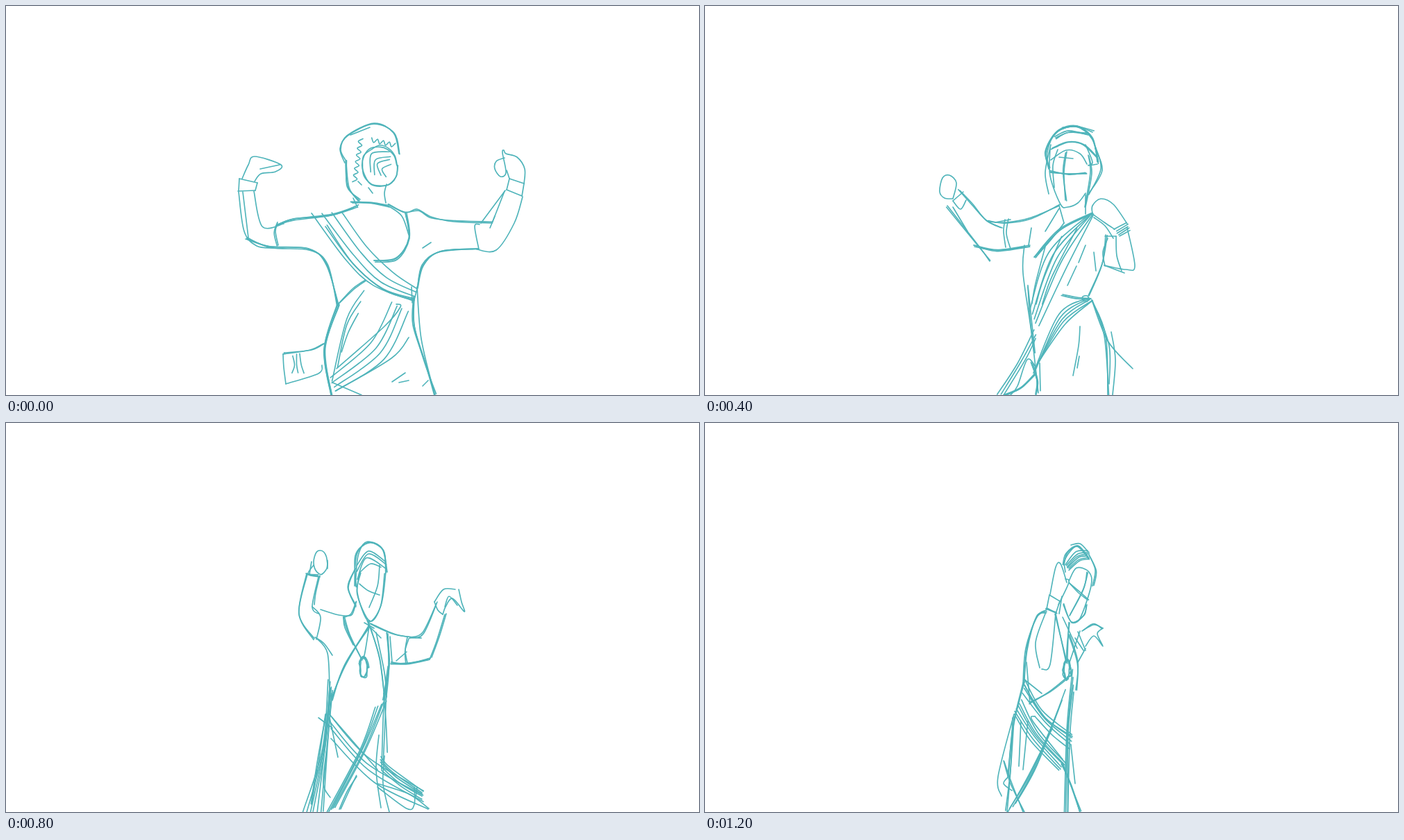
Animation of 998x561 px, one loop 1400 ms. Source, as an HTML page:

```html
<!DOCTYPE html>
<html lang="en">
<head>
<meta charset="utf-8">
<title>Turning dancer sketch</title>
<style>
  html, body { margin: 0; width: 100%; height: 100%; overflow: hidden; background: #fff; }
  svg { display: block; width: 100%; height: 100%; }
  path { fill: none; stroke: #4fb4ba; stroke-width: 1.65; stroke-linecap: round; stroke-linejoin: round; }
  g { visibility: hidden; animation: show 1400ms step-end infinite; animation-delay: calc(var(--i) * 200ms - 1400ms); }
  @keyframes show {
    0% { visibility: visible; }
    14.2857%, 100% { visibility: hidden; }
  }
</style>
</head>
<body>
<svg id="stage" viewBox="0 0 998 561"></svg>
<script>
const stage = document.getElementById("stage");
let group, seed = 7;
const rand = () => (seed = seed * 16807 % 2147483647) / 2147483647;
const jitter = amount => (rand() * 2 - 1) * amount;
const add = (parent, tag) =>
  parent.appendChild(document.createElementNS("http://www.w3.org/2000/svg", tag));
const parse = text => text.split(" ").map(p => p.split(",").map(Number));
const shake = (pts, amount) => pts.map(([x, y]) => [x + jitter(amount), y + jitter(amount)]);

// Catmull-Rom spline through the points as cubic segments
function draw(pts) {
  const at = i => pts[Math.max(0, Math.min(pts.length - 1, i))];
  const handle = (p, a, b) => p.map((v, k) => v + (b[k] - a[k]) / 6);
  let d = "M" + pts[0];
  for (let i = 0; i < pts.length - 1; i++) {
    d += "C" + [handle(at(i), at(i - 1), at(i + 1)), handle(at(i + 1), at(i + 2), at(i)), at(i + 1)];
  }
  add(group, "path").setAttribute("d", d);
}

const line = (...texts) => texts.forEach(t => draw(parse(t)));

// The same stroke sketched over itself n times
function rough(n, ...texts) {
  for (const t of texts) {
    const pts = parse(t);
    for (let k = 0; k < n; k++) draw(k ? shake(pts, 2.3) : pts);
  }
}

// n strokes spread evenly between two guides
function fan(n, from, to) {
  const a = parse(from), b = parse(to);
  for (let k = 0; k < n; k++) {
    const t = k / (n - 1);
    draw(shake(a.map((p, i) => p.map((v, j) => v + (b[i][j] - v) * t)), n > 2 ? 1.2 : 0));
  }
}

function oval(cx, cy, rx, ry, n = 1) {
  for (let k = 0; k < n; k++) {
    const pts = [];
    for (let a = 0; a <= 12; a++) {
      pts.push([cx + rx * Math.cos(a * Math.PI / 6), cy + ry * Math.sin(a * Math.PI / 6)]);
    }
    draw(shake(pts, n > 1 ? 1.8 : 0.6));
  }
}

function zigzag(x1, y1, x2, y2, n, size) {
  const len = Math.hypot(x2 - x1, y2 - y1), pts = [];
  for (let i = 0; i <= n; i++) {
    const off = (i % 2 ? size : -size) / len;
    pts.push([x1 + (x2 - x1) * i / n - (y2 - y1) * off, y1 + (y2 - y1) * i / n + (x2 - x1) * off]);
  }
  draw(pts);
}

function backView() {
  rough(2, "490,224 482,207 491,187 530,169 558,183 566,213");
  line("496,186 524,175");
  rough(3, "489,224 492,260 509,281", "497,283 525,284 550,288");
  zigzag(511, 191, 502, 254, 13, 3);
  zigzag(526, 193, 560, 201, 8, 3);
  oval(538, 231, 26, 29, 2);
  fan(4, "524,240 526,214 552,210", "547,247 541,235 554,229");
  line("548,257 545,270 547,284", "507,253 512,258", "522,262 528,270", "506,290 500,277");

  rough(3, "506,288 470,300 415,307 391,315");
  line("340,249 349,229 358,217 396,229 388,239 367,242 358,253", "366,235 394,229");
  fan(2, "336,249 362,255", "334,267 359,266");
  line("336,249 335,267", "362,255 359,266");
  line("335,268 343,325 361,346 385,349", "341,268 349,334", "357,267 369,318 400,314");
  rough(2, "391,314 388,325 392,345");
  rough(3, "345,336 380,347 435,350 462,373 478,432");

  rough(2, "550,286 575,298 592,293 612,304 645,311 700,313");
  fan(2, "700,313 718,267", "684,313 719,266");
  line("744,275 732,313 706,352 678,351", "704,303 697,320", "682,315 675,318 681,351", "600,349 612,341");
  rough(3, "680,350 625,354 600,375 592,408");
  fan(2, "725,249 746,256", "721,265 743,274");
  fan(2, "725,249 721,265", "746,256 743,274");
  line("746,256 747,235 736,218 720,213 717,208 715,212 720,240 712,246 704,235 706,224 718,219", "725,249 721,237");

  fan(4, "441,300 490,366 530,404 588,425", "485,298 520,348 558,384 592,408");
  rough(2, "460,318 500,372 545,410 588,424", "480,428 500,407 518,395");
  rough(3, "575,298 580,335 562,364 530,367");
  line("550,288 570,303 580,330", "592,408 587,427", "584,405 585,428");
  rough(3, "587,420 586,460 604,515 618,561");
  line("592,405 598,480 616,555");
  rough(4, "478,430 458,495 468,561");
  fan(3, "516,410 490,452 470,540", "508,444 492,470 484,500");
  fan(4, "467,537 525,485 555,428", "475,555 545,510 579,440");
  line("562,430 568,434 545,462 476,523", "580,478 555,508 475,555", "470,543 512,561", "600,548 608,540");
  fan(2, "556,542 575,529", "566,543 580,540");
  rough(2, "399,502 438,496 457,487");
  line("399,502 400,521 403,545", "403,545 450,530 455,518");
  fan(3, "412,504 415,517 411,530", "424,502 424,516 428,530");
}

function sideView() {
  line("500,200 488,238 494,269 512,273", "537,176 547,171 560,186", "500,200 520,230 539,239 540,250 535,259");
  rough(3, "499,195 505,183 540,176 558,186 567,208");
  fan(3, "513,192 530,217 552,240", "505,194 545,194 575,232");
  rough(4, "556,184 562,210 566,240");
  oval(570, 243, 17, 22, 3);
  oval(570, 243, 10, 11, 3);
  line("586,220 594,250 566,265", "551,235 549,265 553,285", "512,273 516,294", "518,278 517,298");
  rough(3, "556,262 560,288 568,298");

  rough(4, "428,334 500,306 565,288");
  line("510,298 575,296", "351,281 345,240 353,237 370,236 369,274", "351,281 359,290", "369,274 373,279");
  fan(2, "359,290 374,279", "375,307 385,295");
  fan(2, "359,290 375,307", "374,279 385,295");
  fan(2, "370,303 390,335 418,375", "376,306 397,345 416,370");
  line("384,294 402,318 427,337");
  rough(2, "413,376 450,368 485,362");
  rough(3, "462,322 470,364", "474,362 473,400 480,445");
  line("484,362 478,410");
  fan(3, "486,334 512,388", "492,345 508,384");
  fan(3, "508,305 562,395", "518,302 572,405");
  fan(9, "526,303 550,345 575,380", "535,302 562,340 580,368");
  line("548,295 570,330 582,350", "558,302 575,310");
  rough(3, "565,290 594,317 590,358", "588,320 585,360 574,440");
  rough(2, "575,370 572,440");

  rough(4, "480,425 515,416 565,407");
  rough(3, "472,450 520,440 572,429", "480,448 480,495 492,561");
  line("482,415 500,422 480,432", "482,425 484,448");
  fan(3, "483,455 490,510 500,550", "490,455 515,505 572,559");
  line("505,455 535,515 570,557", "562,430 605,538");
  fan(4, "574,440 588,490 583,561", "580,450 599,500 597,561");
  fan(3, "568,436 530,478 485,510", "592,473 540,517 440,559");
  fan(2, "560,440 485,500", "590,480 470,548");
  line("570,440 500,530 410,561", "543,462 550,500 547,535", "555,455 568,500 560,550", "547,457 551,455 554,460");
  fan(6, "474,488 440,502 415,530", "478,504 450,530 430,555");
  line("430,510 410,530 388,530 384,528 376,542 386,548 400,546", "383,534 400,538 425,528");
  line("440,520 425,540 435,550", "395,543 420,535 435,545");
  zigzag(404, 544, 424, 556, 6, 4);
}

function threeQuarterView() {
  rough(3, "495,235 491,210 507,182 535,174 558,190 565,225", "505,190 525,182 550,185");
  rough(2, "515,176 535,173 558,182", "500,205 522,196 546,200 565,218", "562,205 572,237 553,270", "552,215 555,240 547,290");
  line("498,200 490,240 495,271", "548,200 558,225 552,230 565,228");
  line("497,205 497,245 512,286 522,290 537,284 548,270", "498,222 520,208 540,213 550,228", "508,207 501,230 503,262");
  rough(3, "497,239 522,242 549,241");
  rough(2, "521,210 517,240 519,280");
  line("510,218 530,220", "510,288 517,313", "548,272 548,300");

  rough(2, "510,288 470,305 435,312 408,311");
  line("357,278 362,255 352,244 342,248 338,268 345,277 357,278", "357,281 372,268", "357,281 368,293 376,280");
  rough(2, "367,266 385,285 405,309 428,320", "349,288 395,347 410,368");
  line("357,290 378,325");
  rough(3, "388,347 420,352 468,345");
  line("418,312 440,308", "470,320 466,345");
  fan(2, "432,308 430,325 433,348", "437,307 434,328 440,350");

  line("460,345 458,385 470,470 480,558", "517,313 500,335 480,358", "510,292 490,325");
  rough(2, "465,405 468,450 474,500");
  rough(3, "474,362 510,322 558,298");
  fan(5, "555,300 495,355 468,440", "558,302 520,375 480,462");
  fan(3, "490,345 475,400 470,430", "535,320 500,390 485,430");
  rough(2, "577,330 572,372 553,418");
  line("560,355 563,382", "535,375 522,403", "548,345 538,370");

  line("558,300 558,288 570,278 588,286 608,314", "558,300 575,312 590,322", "560,305 576,317 588,335");
  fan(5, "590,322 607,313", "598,332 612,323");
  line("608,320 619,375 606,380 575,374", "592,332 593,360 600,382", "575,374 604,385", "576,332 592,332");
  line("580,335 573,355 576,375");

  rough(2, "515,416 535,420 556,422");
  oval(548, 422, 5, 4);
  fan(5, "552,420 510,445 473,530", "558,425 518,458 482,510");
  rough(2, "557,424 577,475 580,561");
  line("562,435 582,490 582,545", "557,424 580,483 616,523", "585,470 591,510 587,561", "540,462 538,490 530,533", "539,505 536,522");
  fan(3, "475,468 450,515 422,561", "476,480 462,510 430,561");
  rough(3, "475,530 455,550 430,561");
  line("476,520 464,510 450,548 440,561", "482,515 483,555");
  rough(3, "470,515 478,540 476,560");
}

function frontView() {
  rough(3, "497,235 494,205 514,178 535,176 552,215");
  fan(5, "500,205 515,187 550,195", "506,215 525,200 548,217");
  line("515,174 528,171 540,176");
  rough(2, "498,225 501,265 514,284 526,285 546,260 552,225", "501,234 520,238 545,241", "520,207 518,240 520,278");
  rough(3, "555,217 558,235 552,252", "495,205 498,250");
  line("503,225 520,205 551,222", "544,227 546,238 540,241", "512,247 513,247", "503,280 502,293", "503,282 520,288 530,283");

  rough(3, "412,313 460,302 482,289 497,297");
  line("353,265 364,242 374,246 371,257 359,272 353,265", "374,246 375,265 361,276", "360,262 368,250", "361,276 370,280 376,267");
  line("376,267 393,290 412,313", "362,277 385,328 400,346 430,349", "380,318 386,330");
  fan(4, "415,312 418,330 422,350", "428,306 426,330 432,352");
  rough(2, "430,348 445,353 468,345");

  rough(3, "462,328 465,352 460,378 468,432");
  line("466,345 475,385 472,420", "460,370 466,398 480,407", "482,290 482,345", "497,297 488,315 482,345");
  rough(2, "485,340 508,312 535,298");
  oval(484, 355, 6, 10, 3);
  fan(3, "517,408 548,408", "517,418 544,421");
  fan(3, "463,404 480,405", "465,426 480,424");
  fan(8, "545,292 505,385 472,470", "562,300 530,375 490,480");
  line("520,330 495,385", "535,290 550,296 557,278 556,300", "555,277 563,298");

  rough(4, "535,290 555,305 588,335");
  line("588,335 602,346 617,325");
  rough(3, "588,335 560,375 548,430");
  line("575,345 560,370 553,400");
  line("627,315 628,300 612,283 594,291 592,303 604,319 627,315");
  rough(3, "612,325 622,318 624,330 615,332");
  line("627,315 624,345 615,382");
  rough(2, "560,370 580,374 612,382", "563,365 580,361", "548,375 545,420 548,440");

  fan(4, "467,432 456,500 452,561", "474,425 470,485 460,561");
  line("455,490 444,552", "460,475 468,462 472,482 455,520", "462,480 474,470 468,505 458,530 470,505 465,535");
  fan(3, "530,430 490,490 470,550", "541,420 500,487 467,561");
  fan(2, "535,450 520,525 503,561", "545,430 530,500 507,556");
  fan(5, "549,430 553,490 555,561", "548,420 565,475 566,558");
  rough(2, "552,435 595,503 568,530");
  line("555,445 590,500", "575,495 588,492 583,503 596,502", "565,470 578,500 560,520");
}

function turningView() {
  rough(3, "502,235 505,190 522,173 542,182 549,215");
  fan(3, "505,205 522,184 547,200", "506,225 520,194 548,210");
  rough(2, "502,212 493,238 504,263", "510,215 506,245 522,286 540,263 547,215", "504,258 497,275 487,280");
  line("510,215 525,203 540,208", "509,232 522,242 538,248", "538,205 535,235 523,266");
  rough(3, "522,286 524,294");
  line("516,288 530,296");

  oval(453, 201, 10, 17);
  line("443,205 435,218 452,222", "440,200 437,218", "463,198 463,210");
  rough(2, "434,218 422,275 444,311", "432,217 450,221");
  fan(2, "450,222 441,265 450,275", "452,220 446,245 444,262");
  line("441,265 453,280 447,312", "453,269 475,276 487,278", "447,310 463,332 466,390", "445,309 458,318 470,335");

  rough(2, "525,290 560,305 596,310", "578,309 575,328 578,346");
  line("553,308 556,345", "562,343 577,330");
  rough(3, "554,347 580,346 610,341");
  fan(2, "610,341 620,315 632,276", "613,338 624,308 634,275");
  rough(2, "582,309 600,302 620,260");
  line("617,258 630,240 647,240", "617,258 622,270 629,276", "652,240 656,258 660,272 643,253 633,265 629,276", "650,263 638,250 632,265");

  rough(2, "487,278 495,305 512,340");
  line("486,280 488,295 500,320", "523,293 518,325 515,340");
  oval(515, 352, 6, 14, 3);
  rough(3, "523,293 487,350 470,400", "550,304 551,350 545,400");
  rough(2, "525,295 538,340 545,395");
  line("533,302 545,360 548,395", "526,296 540,310");

  fan(7, "465,370 456,470 428,561", "470,390 462,470 458,561");
  rough(2, "460,420 450,490 440,550");
  line("466,425 478,482", "450,425 470,440", "462,470 457,520 467,540");
  fan(3, "550,350 545,400 540,500", "545,390 547,430 548,476");
  line("537,450 533,500 540,555", "545,480 543,520 552,561");
  fan(5, "533,410 510,470 462,561", "547,400 517,472 474,555");
  rough(2, "505,510 492,530 480,557");
  fan(3, "465,420 520,480 602,530", "468,440 520,500 600,545");
  line("470,425 535,500", "468,455 530,518 608,557");
  fan(5, "540,480 552,497 600,530", "540,500 570,525 600,542");
  line("535,520 580,535 609,556", "588,525 588,550 577,556 535,525", "592,525 590,540");
}

function crossingView() {
  rough(2, "512,185 516,168 530,163 545,180 556,200 553,230");
  fan(5, "512,190 525,170 550,190", "515,195 530,182 546,188");
  rough(3, "525,200 545,200 552,208");
  line("517,210 514,245 520,285 536,278 553,215", "522,285 545,262 550,230");
  line("518,220 530,235 547,247", "540,205 538,235 525,273", "518,215 540,207");

  line("513,215 506,184 500,188 497,200", "495,195 495,250 486,287", "494,205 494,190 498,198", "513,215 517,252 504,290", "486,287 503,297", "486,280 502,288");
  rough(3, "485,290 498,297", "490,272 472,288 462,320");
  line("485,283 472,305 468,325", "466,320 472,322");
  rough(2, "466,318 470,350 488,345", "467,358 492,340 501,297");

  rough(2, "532,350 550,344 570,335", "540,378 558,365 576,356", "562,337 568,360");
  line("535,385 565,363 585,345", "572,333 577,350", "572,332 577,275 580,267 586,320", "579,268 579,300");
  rough(2, "586,320 593,305 591,325 578,352");

  line("510,270 520,288", "520,285 526,310 532,345", "518,285 517,340 508,385");
  rough(3, "463,320 460,405 440,500", "530,345 537,410 531,500");
  line("460,320 464,430");
  rough(2, "490,305 510,325 530,348");
  line("497,297 515,335", "520,303 524,303 526,308");
  oval(525, 357, 5, 11, 4);
  fan(4, "508,378 492,395 477,407", "508,390 495,405 476,416");
  line("508,390 523,432", "506,390 515,410");
  fan(2, "523,372 510,415 505,448", "527,375 510,420 502,455");

  fan(3, "455,390 490,442 530,485", "470,420 510,454 545,500");
  fan(3, "468,425 525,495", "455,450 523,530");
  line("470,487 490,520 533,541", "470,487 478,490 533,541");
  rough(2, "447,435 460,440 456,455");
  fan(5, "453,440 437,500 429,561", "453,450 442,505 437,561");
  line("455,450 444,500 443,534");
  fan(4, "530,470 533,515 552,561", "531,480 540,520 564,550");
  rough(2, "530,490 545,535 560,561");
  line("530,515 535,561", "518,464 535,485", "535,455 540,460");
}

function leaningView() {
  rough(3, "517,205 522,187 538,178 553,195");
  fan(6, "520,205 535,186 552,184", "525,212 540,200 552,196");
  line("527,176 540,174 552,186");
  rough(2, "553,190 562,212 558,235", "524,230 538,245 551,255", "550,215 545,240 525,278");
  line("524,228 535,209 553,215 556,235 540,282 528,288");
  rough(2, "516,262 528,287 545,278 550,262");

  line("497,247 505,208 512,203 521,230", "517,203 519,215", "519,225 524,230 509,262", "496,248 511,257", "496,248 492,268", "511,257 505,275");
  rough(3, "491,268 506,273", "492,272 478,280 462,325 458,375");
  line("490,275 476,317 482,353", "485,355 497,348 505,275");
  line("537,345 548,325", "525,345 540,300", "533,310 545,328", "537,301 548,328");
  rough(2, "543,300 560,291 573,296");
  line("573,296 565,304 573,322 560,307 548,322");

  rough(2, "505,275 520,345", "525,288 522,315 520,345", "467,405 495,388 520,368", "525,305 537,345 534,385");
  line("515,280 536,325", "514,250 510,275", "463,345 468,405", "460,370 485,390");
  oval(521, 356, 5, 14, 4);
  fan(4, "529,355 521,440 518,561", "532,388 525,450 523,561");

  rough(2, "458,375 443,440 437,510");
  line("445,420 422,510 427,538", "458,375 490,425 529,452");
  fan(4, "460,370 485,415 528,450", "458,390 490,432 528,465");
  fan(6, "455,400 480,445 520,490", "445,420 470,458 510,500");
  line("475,423 500,450 525,470", "475,423 472,430 515,485");
  fan(5, "500,440 465,512 436,561", "518,385 480,490 450,545");
  rough(2, "443,425 440,500 435,561", "430,487 440,520 460,561");
  line("455,430 452,495", "465,430 458,500", "527,465 533,520", "437,510 430,520 442,530");
  rough(3, "515,490 526,520 540,561");
}

[backView, sideView, threeQuarterView, frontView, turningView, crossingView, leaningView].forEach((pose, i) => {
  group = add(stage, "g");
  group.style.setProperty("--i", i);
  pose();
});
</script>
</body>
</html>
```
